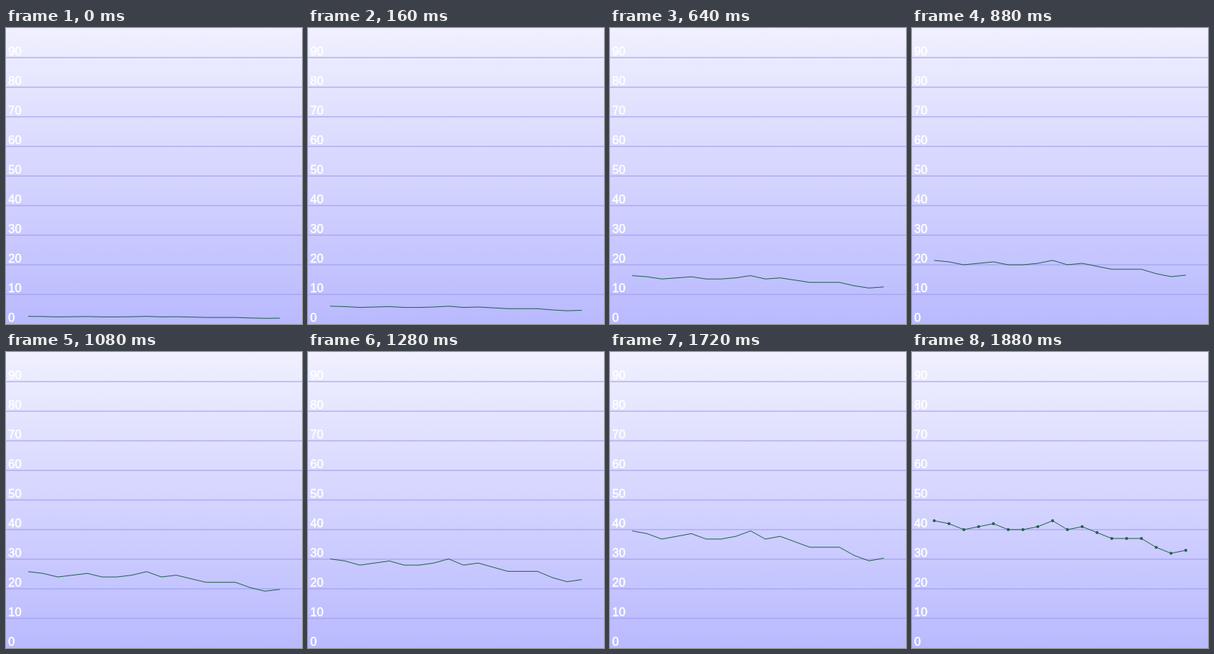
An HTML page that plays this animation: 400 px wide and 400 px high, repeating every 2.4 s.

```html
<!DOCTYPE html>
<html lang="en">
<head>
<meta charset="utf-8">
<title>Line chart</title>
<style>
  html, body { margin: 0; width: 100%; height: 100%; overflow: hidden; }
  svg { display: block; width: 100vw; height: 100vh; }
  text { font: 16px "Liberation Sans", Arial, sans-serif; fill: #fff; stroke: #fff; stroke-width: .5; }
</style>
</head>
<body>
<svg viewBox="0 0 400 400">
  <defs>
    <linearGradient id="sky" x1="0" y1="0" x2="0" y2="1">
      <stop offset="0" stop-color="#f0f0ff"/>
      <stop offset="1" stop-color="#b9b9ff"/>
    </linearGradient>
  </defs>
  <rect width="400" height="400" fill="url(#sky)"/>
  <g id="grid" stroke="#9999ee"></g>
  <g id="labels"></g>
  <polyline id="line" fill="none" stroke="#206050"/>
  <g id="dots" fill="#206050"></g>
</svg>
<script>
const LOOP = 2400, STEP = 40, START = 0.06, GAIN = 0.02;
const values = [43, 42, 40, 41, 42, 40, 40, 41, 43, 40, 41, 39, 37, 37, 37, 34, 32, 33];
const byId = id => document.getElementById(id);
const xAt = i => 30 + 20 * i;
const yAt = value => 400 - 4 * value;

function add(parent, tag, attrs, text = "") {
  const node = document.createElementNS("http://www.w3.org/2000/svg", tag);
  for (const key in attrs) node.setAttribute(key, attrs[key]);
  node.textContent = text;
  byId(parent).append(node);
}

for (let value = 0; value < 100; value += 10) {
  const y = yAt(value);
  if (value) add("grid", "line", { x1: 0, x2: 400, y1: y, y2: y });
  add("labels", "text", { x: 3, y: y - 3 }, value);
}
values.forEach((value, i) => add("dots", "circle", { cx: xAt(i), cy: yAt(value), r: 2 }));

function draw(time) {
  const step = Math.floor((time % LOOP) / STEP);
  const progress = Math.min(1, START + GAIN * step);
  byId("line").setAttribute("points",
    values.map((value, i) => `${xAt(i)},${yAt(value * progress).toFixed(2)}`).join(" "));
  byId("dots").setAttribute("visibility", progress > 0.999 ? "visible" : "hidden");
}

const origin = performance.now();
function tick() {
  draw(performance.now() - origin);
  requestAnimationFrame(tick);
}
tick();
</script>
</body>
</html>
```
